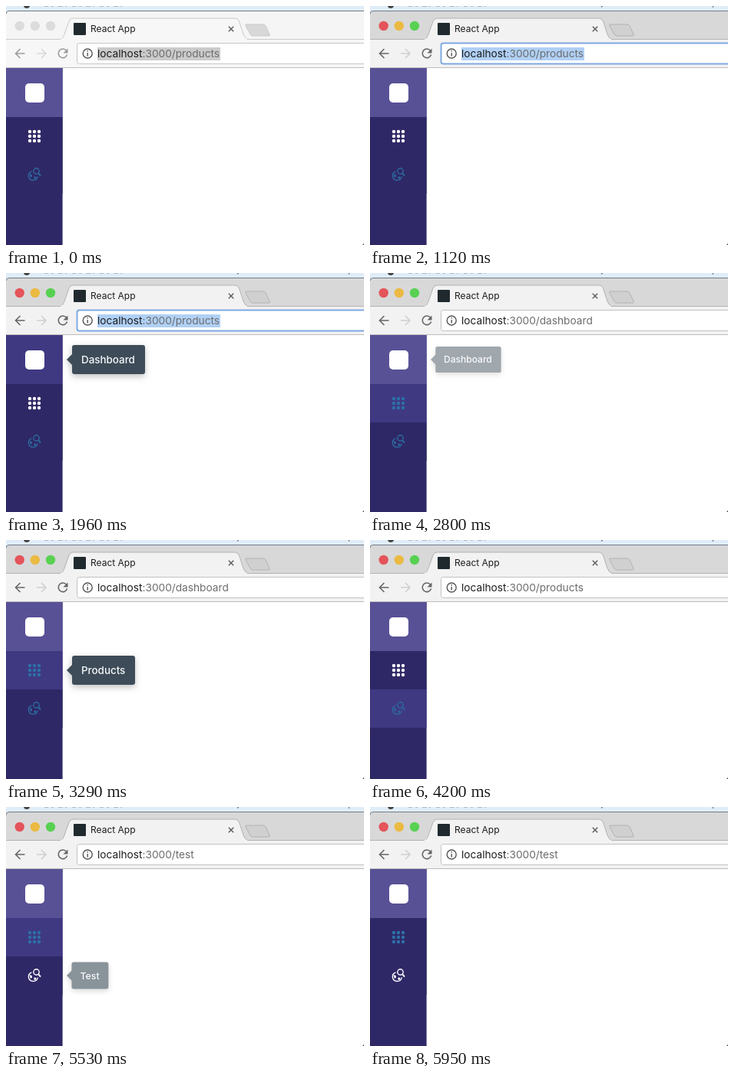
An HTML page that plays this animation: 466 px wide and 312 px high, repeating every 6300 ms.

```html
<!DOCTYPE html>
<html lang="en">
<head>
<meta charset="utf-8">
<title>Sidebar navigation</title>
<style>
html, body { margin: 0; width: 100%; height: 100%; overflow: hidden; background: #fff; }
svg {
  display: block; width: 466px; height: 312px;
  font-family: Inter, Roboto, sans-serif;
  --loop: 6300ms;
  animation: window var(--loop) step-end infinite;
}

/* Window focus, then loss of focus in the address field */
@keyframes window {
  0% {
    --strip: #f5f5f5; --tool: #f7f7f7; --edge: #c9c9c9; --plus: #d8d8d8; --ink: #9b9b9b; --off: #d9d9d9;
    --red: #dcdcdc; --amber: #dcdcdc; --green: #dcdcdc; --menu: 0;
    --sel: #cbcbcb; --field: #c6c6c6; --ring: 1px;
  }
  17.778% {
    --strip: #d8d8d9; --tool: #f2f2f2; --edge: #b2b2b2; --plus: #d0d0d0; --ink: #666; --off: #d0d0d0;
    --red: #e4545a; --amber: #ebba42; --green: #58d152; --menu: .6;
    --sel: #b0d0f5; --field: #7ea9e2; --ring: 2px;
  }
  32.222%, 100% {
    --strip: #d8d8d9; --tool: #f2f2f2; --edge: #b2b2b2; --plus: #d0d0d0; --ink: #666; --off: #d0d0d0;
    --red: #e4545a; --amber: #ebba42; --green: #58d152; --menu: .6;
    --sel: transparent; --field: #c2c2c2; --ring: 1px;
  }
}
.strip { fill: var(--strip); }
.tool { fill: var(--tool); }
.edge { stroke: var(--edge); }
.ink { fill: none; stroke: var(--ink); stroke-width: 1.6; }
.field { fill: #fff; stroke: var(--field); stroke-width: var(--ring); }

/* Address */
.url { font-size: 13.7px; fill: #1c1c1c; }
.path { fill: #6c6c6c; }
.products-url { animation: products-url var(--loop) step-end infinite; }
.dashboard-url { animation: dashboard-url var(--loop) step-end infinite; }
.test-url { animation: test-url var(--loop) step-end infinite; }
@keyframes products-url { 0%, 54.444% { opacity: 1 } 32.222%, 76.667%, 100% { opacity: 0 } }
@keyframes dashboard-url { 0%, 54.444%, 100% { opacity: 0 } 32.222% { opacity: 1 } }
@keyframes test-url { 0% { opacity: 0 } 76.667%, 100% { opacity: 1 } }

/* Sidebar rows */
.row { fill: #2f2866; }
.home-row { animation: home-row var(--loop) step-end infinite; }
.products-row { animation: products-row var(--loop) step-end infinite; }
.test-row { animation: test-row var(--loop) step-end infinite; }
@keyframes home-row { 0%, 43.333%, 100% { fill: #585196 } 24.444% { fill: #3f3982 } }
@keyframes products-row {
  0%, 63.333%, 92.222%, 100% { fill: #2f2866 }
  44.444%, 86.667% { fill: #3f3982 }
}
@keyframes test-row { 0%, 85.556%, 100% { fill: #2f2866 } 64.444% { fill: #3f3982 } }

/* Icons: white on the open page, blue otherwise */
.products-icon { animation: products-icon var(--loop) linear infinite; }
.test-icon { animation: test-icon var(--loop) linear infinite; }
@keyframes products-icon {
  0%, 32.222%, 56.032%, 76.667% { color: #fff }
  33.333%, 54.444%, 78.254%, 100% { color: #2d70a6 }
}
@keyframes test-icon { 0%, 76.667% { color: #2d6a9f } 78.254%, 100% { color: #fff } }

/* Tooltips */
.tip { fill: #3d4c58; filter: drop-shadow(0 3px 4px rgba(0, 0, 0, .25)); }
.tip text { font-size: 13.4px; font-weight: 500; fill: #f5f8fa; }
.home-tip { animation: home-tip var(--loop) linear infinite; }
.products-tip { animation: products-tip var(--loop) linear infinite; }
.test-tip { animation: test-tip var(--loop) linear infinite; }
@keyframes home-tip {
  0%, 26.667%, 45.556%, 100% { opacity: 0; transform: scale(.8) }
  28.889%, 43.333% { opacity: 1; transform: none }
}
@keyframes products-tip {
  0%, 47.778%, 65.556%, 90%, 93.968%, 100% { opacity: 0; transform: scale(.8) }
  50%, 63.333%, 91.667%, 92.222% { opacity: 1; transform: none }
}
@keyframes test-tip {
  0%, 67.302%, 89.048%, 100% { opacity: 0; transform: scale(.8) }
  68.889%, 86.984% { opacity: 1; transform: none }
}
</style>
</head>
<body>
<svg viewBox="0 0 466 312">
  <rect width="466" height="312" fill="#fff"/>

  <!-- Menu bar -->
  <rect width="466" height="12" fill="#e0edf8"/>
  <circle cx="27" cy="-1" r="4" fill="#444"/>
  <path d="M50 0H154" stroke="#222" stroke-dasharray="5 4 3 6 6 3 2 7" opacity=".5"/>
  <path d="M301 1.500l2-2M446.500 0v2" stroke="#222" stroke-width="1.200" style="opacity: var(--menu)"/>

  <!-- Tab strip -->
  <path class="strip" d="M0 44V11q0-4 4-4H466V44z"/>
  <path d="M0 10.500q0-4 4-4H466" fill="none" stroke="#727c86"/>
  <circle cx="17.700" cy="26" r="6.200" style="fill: var(--red)"/>
  <circle cx="37.800" cy="26" r="6.200" style="fill: var(--amber)"/>
  <circle cx="58" cy="26" r="6.200" style="fill: var(--green)"/>
  <path class="edge" d="M313 24H335q2 0 3 2l5 11q1 2-1 2H321q-2 0-3-2l-6-11q-1-2 1-2z" style="fill: var(--plus)"/>
  <rect class="tool" y="43" width="466" height="38"/>
  <path class="edge" d="M0 43.500H466"/>
  <path class="tool edge" d="M70 43.500c4-.5 4-2.500 6-6.500L82 20q1.500-4 5-4H298q4 0 5.500 4L309 37q2.500 6 6 6.500"/>
  <path d="M71 43.500H314" style="stroke: var(--tool)" stroke-width="1.600"/>
  <rect x="88" y="22" width="16" height="16" rx="1" fill="#20292e"/>
  <text x="110" y="34.300" font-size="12" fill="#1c1c1c">React App</text>
  <path d="M289.800 26.800l6.400 6.400m0-6.400l-6.400 6.400" stroke="#5c5c5c" stroke-width="1.400"/>

  <!-- Toolbar -->
  <path class="ink" d="M24.500 62H12.500m6-6l-6 6 6 6"/>
  <path class="ink" d="M40 62H52m-6-6l6 6-6 6" style="stroke: var(--off)"/>
  <path class="ink" d="M78.600 58.200A5.800 5.800 0 1 0 79.600 63.500"/>
  <path d="M80.500 55.500v6h-6z" style="fill: var(--ink)"/>
  <rect class="field" x="92.500" y="48.500" width="390" height="27" rx="3"/>
  <g fill="none" stroke="#555" stroke-width="1.400">
    <circle cx="106.200" cy="62" r="6"/>
    <path d="M106.200 61v4.500m0-7.500v1.600"/>
  </g>
  <rect x="119" y="54" width="160" height="17" style="fill: var(--sel)"/>
  <g class="url">
    <text class="products-url" x="119" y="67">localhost<tspan class="path">:3000/products</tspan></text>
    <text class="dashboard-url" x="119" y="67">localhost<tspan class="path">:3000/dashboard</tspan></text>
    <text class="test-url" x="119" y="67">localhost<tspan class="path">:3000/test</tspan></text>
  </g>
  <path d="M0 80.500H466" stroke="#bdbdbd"/>

  <!-- Sidebar -->
  <rect class="row" y="81" width="73.600" height="231"/>
  <rect class="row home-row" y="81" width="73.600" height="64"/>
  <rect class="row products-row" y="145" width="73.600" height="50"/>
  <rect class="row test-row" y="195" width="73.600" height="50"/>
  <rect x="25" y="101" width="25" height="25" rx="5" fill="#fff"/>
  <path class="products-icon" d="M31 164h12.100M31 170h12.100M31 176h12.100" fill="none" stroke="currentColor"
    stroke-width="4.400" stroke-linecap="round" stroke-dasharray="0 6"/>
  <g class="test-icon" fill="none" stroke="currentColor" stroke-width="1.400">
    <path d="M33.500 215.800A6 6 0 1 0 41.300 222.500"/>
    <circle cx="39.500" cy="215.500" r="3.700"/>
    <path d="M42.200 218.300l2.800 3.400" stroke-width="2"/>
    <path d="M30.500 219l3 1 .5 2.500-2 1.500zM36.500 222.500l3 .5-1 3-2-.5z" fill="currentColor" stroke="none"/>
  </g>

  <!-- Tooltips, each anchored at its arrow tip -->
  <g transform="translate(79 113)">
    <g class="tip home-tip">
      <path d="M0 0L8-8V8z"/>
      <rect x="7" y="-19" width="95" height="38" rx="3"/>
      <text x="19" y="5">Dashboard</text>
    </g>
  </g>
  <g transform="translate(79 170)">
    <g class="tip products-tip">
      <path d="M0 0L8-8V8z"/>
      <rect x="7" y="-19" width="82" height="38" rx="3"/>
      <text x="19" y="5">Products</text>
    </g>
  </g>
  <g transform="translate(79 220)">
    <g class="tip test-tip">
      <path d="M0 0L8-8V8z"/>
      <rect x="7" y="-19" width="52" height="38" rx="3"/>
      <text x="19" y="5">Test</text>
    </g>
  </g>

  <path d="M466 309.500V312h-2.500q2 0 2.500-2.500z" fill="#222"/>
</svg>
</body>
</html>
```
